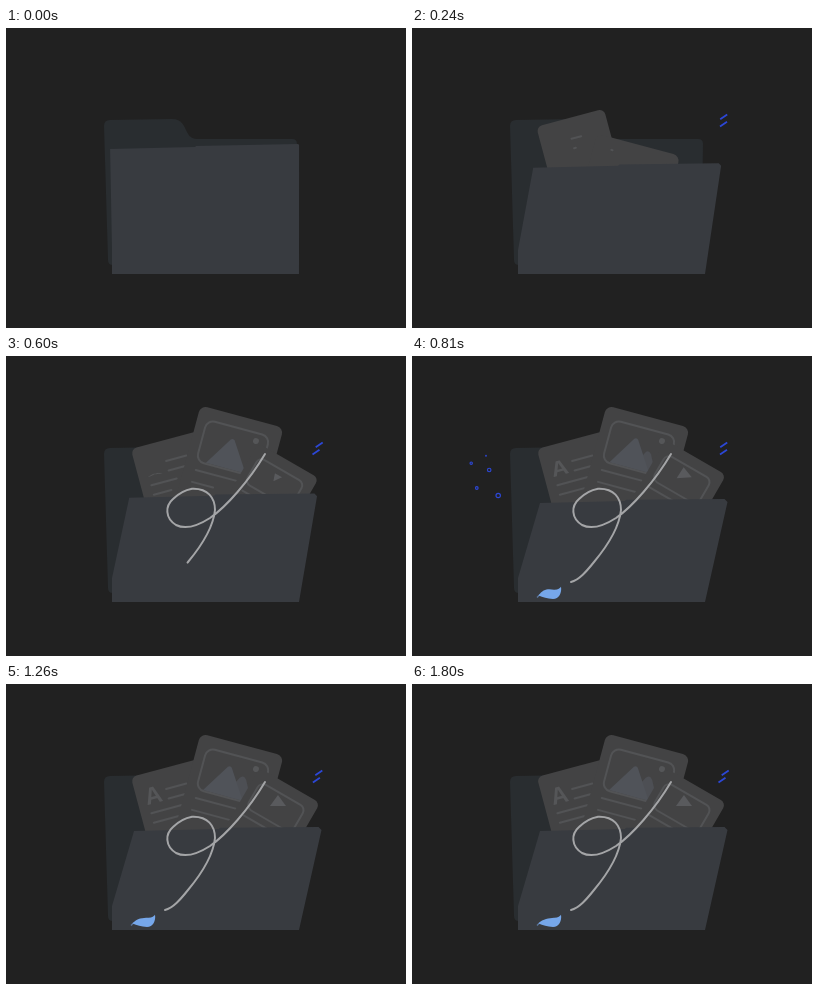
Write an HTML page that moves like this. It is 400 by 300 pixels and loops after 1.83 s.

```html
<!DOCTYPE html>
<html lang="en">
<head>
<meta charset="utf-8">
<title>Folder</title>
<style>
html, body { margin: 0; height: 100%; overflow: hidden; background: #212121; }
svg { display: block; width: 100vw; height: 100vh; }
.ink { fill: none; stroke: #525355; stroke-width: 2; stroke-linecap: round; }
.paper { fill: #434344; }
.blue { fill: none; stroke: #2c47d6; stroke-width: 1.8; }
#bubbles circle { transform-box: fill-box; transform-origin: center; transform: scale(var(--size)); }
text { font: bold 24px "Liberation Sans", Arial, sans-serif; fill: #555658; text-anchor: middle; }
</style>
</head>
<body>
<svg viewBox="0 0 400 300">
  <clipPath id="above"><path d="M0 0H400V240H0Z"/></clipPath>
  <path fill="#292d30" d="M98 98Q98 92 104 92L166 91C176 91 178 98 181 104C184 110 187 111 192 111L286 111Q291 111 291 116L289 237H107Q102 237 102 232Z"/>

  <g clip-path="url(#above)">
    <g id="doc">
      <rect class="paper" width="70" height="95" rx="6"/>
      <g id="letter"><text x="17">A</text></g>
      <path id="rows" class="ink"/>
    </g>

    <g id="photo">
      <rect class="paper" width="86" height="100" rx="7"/>
      <rect id="frame" class="ink" x="10" y="12" width="65" height="43" rx="8" pathLength="1"/>
      <circle cx="62.7" cy="20" r="3" fill="#555658"/>
      <path id="hill" fill="#4d4f54" d="M-13 0L-3 -21Q0 -26 4 -21L15 0Z"/>
      <path id="peak" fill="#505359" d="M17 54L35 25Q37 23 39 25L58 54Z"/>
      <path id="caption" class="ink"/>
    </g>

    <g id="video">
      <rect class="paper" width="70" height="95" rx="6"/>
      <rect class="ink" x="8" y="11.5" width="52" height="29.5" rx="6"/>
      <path class="ink" d="M10 49H52"/>
      <path id="play" fill="#595a5d" d="M0 -7L8 4H-8Z"/>
    </g>
  </g>

  <path id="front" fill="#383b40"/>

  <path id="trail" fill="none" stroke="#a4a5a7" stroke-width="2" stroke-linecap="round" pathLength="1"
    d="M259 98C243 125 220 151 204 162C190 171 178 173 170 169C159 162 159 150 167 143C172 138 179 134 186 132.700C202 132 209 142 209 154C207 174 192 194 182 206C174 216 167 224 159 226"/>
  <g id="leaf">
    <path d="M125 241.500L128 238.500" stroke="#5b7599" stroke-width="1.500"/>
    <path id="blade" fill="#76a7ea"/>
  </g>

  <path id="dashes" class="blue"/>
  <g id="bubbles" class="blue">
    <circle cx="86.2" cy="139.5" r="3.4"/>
    <circle cx="77.2" cy="114" r="2.7"/>
    <circle cx="64.8" cy="132" r="2"/>
    <circle cx="59.2" cy="107.2" r="1.8"/>
    <circle cx="74" cy="99.8" r=".6"/>
  </g>
</svg>
<script>
const LOOP = 1830, BEAT = 600;
const $ = id => document.getElementById(id);
const set = (id, name, value) => $(id).setAttribute(name, value);
const move = (id, value) => set(id, 'transform', value);
const ramp = (t, from, to) => Math.min(1, Math.max(0, (t - from) / (to - from)));
const smooth = u => u * u * (3 - 2 * u);

// Lifts a sheet out of the folder to rest at x, y.
function rise(id, t, start, time, x, y, slant, angle) {
  const drop = 100 * (1 - ramp(t, start, start + time)) ** 3;
  move(id, `translate(${x + slant * drop} ${y + drop}) rotate(${angle})`);
}

// Draws a stroke up to the given share of its length.
function trace(id, share) {
  set(id, 'stroke-dasharray', `${share} 2`);
  $(id).style.display = share ? '' : 'none';
}

function drawSheets(t) {
  const late = smooth(ramp(t, 640, 860));
  rise('doc', t, 10, 377, 124.8, 93, -.1, -15);
  rise('photo', t, 175, 377, 194.6, 49.5, -.17, 15);
  rise('video', t, 225, 550, 253.5, 84, -.4, 30);

  let rows = '';
  for (let i = 0; i < 4; i++) {
    const wide = i > 1, begin = 130 + 90 * i;
    const length = Math.min(wide ? 42 : 21, (t - begin) * .09);
    if (length > 0) rows += `M${wide ? 10.5 : 31} ${20.7 + 9.8 * i}h${length}`;
  }
  set('rows', 'd', rows);
  move('letter', `translate(0 31.5) scale(1 ${.1 * ramp(t, 290, 390) + .9 * late})`);

  trace('frame', ramp(t, 240, 400));
  move('peak', `translate(${3 * (1 - late)} 0)`);
  move('hill', `translate(52 54) scale(${late})`);
  set('caption', 'd', `M12 63.5h${52 * ramp(t, 300, 450)}M11.5 76h${52 * ramp(t, 400, 880)}`);
  const size = .6 * ramp(t, 480, 590) + .4 * late;
  move('play', `translate(33 20.2) rotate(${-30 - 25 * (1 - late)}) scale(${size})`);
}

// The flap swings open, dips back once and settles.
function drawFlap(t) {
  const open = 1 - (1 - ramp(t, 0, 460)) ** 1.7 - .2 * Math.sin(Math.PI * ramp(t, 460, 760));
  const left = `${104 + 24 * open} ${121 + 26 * open}`;
  const right = `${292 + 20.5 * open} ${116 + 27 * open}`;
  const lip = 1 + 2 * open;
  set('front', 'd', `M106 246V222L${left}l85 -2 1 -1.2L${right}l${lip} ${lip}L293 246Z`);
}

function drawAccents(t) {
  const phase = Math.PI * t / BEAT;
  const pulse = Math.sin(phase) ** 4, slide = Math.cos(phase) ** 6;

  trace('trail', smooth(ramp(t, 360, 660)));

  move('leaf', `translate(149 231) scale(${smooth(ramp(t, 650, 780))}) translate(-149 -231)`);
  const top = 232.5 + 2 * slide;
  set('blade', 'd', `M126.500 239.500C131 ${top} 137 ${top} 142 233.800C146 234 148 232 149 230.800C150 237 147 243 141 243C135 242.500 131 241.500 126.500 239.500Z`);

  const reach = ramp(t, 60, 180), shift = 1.5 * slide;
  const dash = `l${7 * reach} ${-4.8 * reach}`;
  set('dashes', 'd', reach ? `M${308.2 + shift} 91.2${dash}M${308 - shift} 98.5${dash}` : '');

  $('bubbles').style.setProperty('--size', t < BEAT ? 0 : .03 + .97 * pulse);
}

const start = performance.now();
function tick() {
  const t = (performance.now() - start) % LOOP;
  drawSheets(t);
  drawFlap(t);
  drawAccents(t);
  requestAnimationFrame(tick);
}
tick();
</script>
</body>
</html>
```
